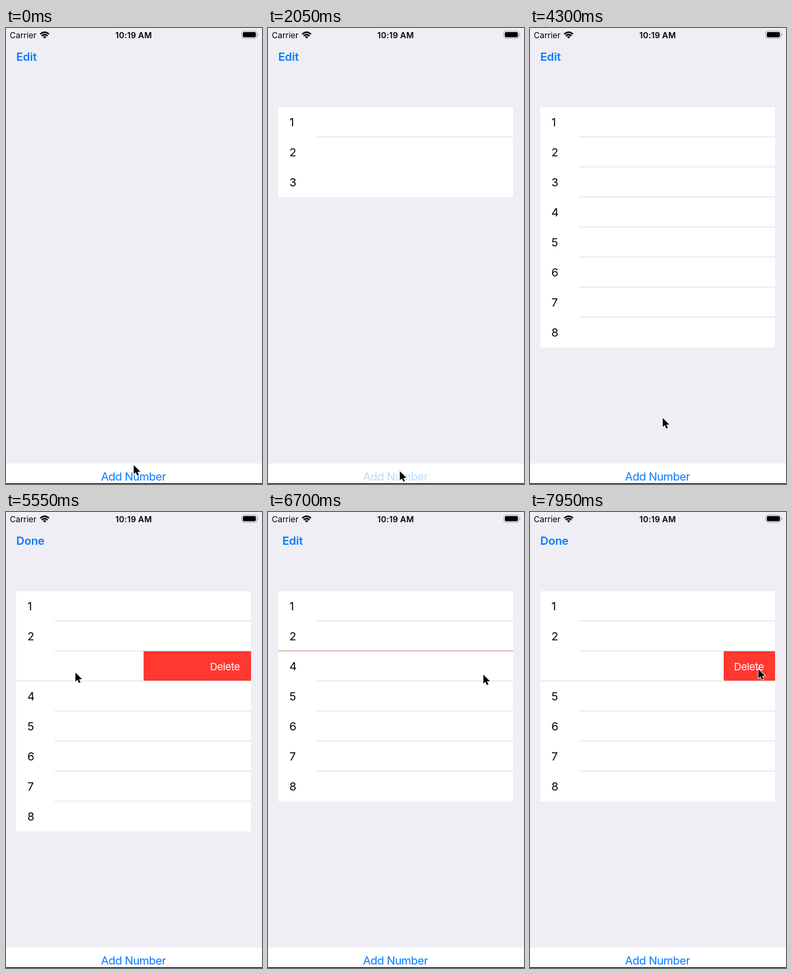
An HTML page that plays this animation: 374x668 px, repeating every 8 s.

```html
<!DOCTYPE html>
<html lang="en">
<meta charset="utf-8">
<title>Number list</title>
<style>
  html, body { margin: 0; width: 100%; height: 100%; overflow: hidden; background: #efeef5; }
  svg { display: block; }
  text { font: 16.5px Inter, "Liberation Sans", sans-serif; letter-spacing: -.4px; }
  .bold { font-weight: 600; letter-spacing: -.15px; }
  .status { font-size: 12px; letter-spacing: -.05px; }
  .time { letter-spacing: .12px; }
  .blue { fill: #007aff; }
  .delete { font-size: 15px; letter-spacing: -.3px; fill: #fff; }
  .sep { fill: #dededf; }
</style>
<svg width="374" height="668" viewBox="0 0 374 668">
  <rect width="374" height="668" fill="#efeef5"/>
  <text class="status" x="5.5" y="14.5">Carrier</text>
  <g fill="none" stroke="#000" stroke-width="2.3">
    <path d="M50 9Q56.4 3.2 62.8 9M52.2 11.6Q56.4 8 60.6 11.6"/>
    <path d="M56.4 15.6L54 13Q56.4 11.2 58.8 13Z" fill="#000" stroke="none"/>
  </g>
  <text class="bold status time" x="186.5" y="14.5" text-anchor="middle">10:19 AM</text>
  <rect x="344.5" y="4.5" width="22" height="10.5" rx="3" fill="none" stroke="#a5a5aa"/>
  <rect x="346" y="6" width="19" height="7.5" rx="1.7"/>
  <path d="M367.7 8v3.6q1.3-.6 1.3-1.8t-1.3-1.8" fill="#a5a5aa"/>
  <text id="edit" class="blue bold" y="48">Edit</text>
  <text id="done" class="blue bold" x="15" y="48">Done</text>
  <g id="list"></g>
  <rect y="638" width="374" height="30" fill="#fff"/>
  <text id="add" class="blue" x="186.2" y="662.5" text-anchor="middle">Add Number</text>
  <rect y="667" width="374" height="1"/>
  <g id="cursor">
    <path d="M.6 1.2v13.2l3-2.7 2.1 4.8 2.3-1-2.1-4.6h4.3Z"
          stroke="#fff" stroke-width="1.6" paint-order="stroke"/>
  </g>
</svg>
<script>
const LOOP = 8000, LEFT = 15, RIGHT = 358, WIDTH = RIGHT - LEFT, TOP = 116, ROW = 44;
const BUTTON = 75;

const $ = id => document.getElementById(id);
const clamp = u => Math.min(1, Math.max(0, u));
const mix = (a, b, u) => a + (b - a) * u;
const smooth = u => u * u * (3 - 2 * u);
const easeIn = u => u * u;
const easeOut = u => u * (2 - u);
// Progress from 0 to 1 of a step that begins at start
const step = (t, start, time, ease = smooth) => ease(clamp((t - start) / time));

// The first tap is slow, the others come ever faster
const taps = Array.from({ length: 8 }, (_, i) => {
  const k = i - 1, up = i ? 1600 + 440 * k - 11 * k * k : 780;
  return { down: up - (i ? 140 : 290), up };
});

const swipes = [
  { row: 3, from: 4700, to: 5500, remove: 6150 },
  { row: 4, from: 6800, to: 7300, remove: Infinity }
];

// Cursor moves: start, duration, end x, end y, easing
const moves = [
  [50, 300, 192, 648],
  [4000, 300, 193, 573, easeIn],
  [4300, 250, 233, 219, easeOut],
  [4700, 650, 73, 231],
  [5500, 50, 100, 234, easeIn],
  [5550, 500, 314, 237, easeOut],
  [6800, 400, 205, 240],
  [7300, 500, 333, 229]
];

function cursorAt(t) {
  let x = 186, y = 639;
  for (const [start, time, toX, toY, ease] of moves) {
    const u = step(t, start, time, ease);
    x = mix(x, toX, u);
    y = mix(y, toY, u);
  }
  return { x, y };
}

// Follows the cursor, settles on the button, then fills the row
function swipeWidth(t, { from, to, remove }) {
  const drag = cursorAt(from).x - cursorAt(Math.min(t, to)).x;
  const open = mix(drag, BUTTON, step(t, to, 450));
  return mix(open, WIDTH, step(t, remove, 200, easeOut));
}

const rect = (x, y, w, h, attrs) =>
  `<rect x="${x}" y="${y}" width="${w}" height="${h}" ${attrs}/>`;

function swipedRow(n, y, h, w) {
  return `<svg x="${LEFT}" y="${y}" width="${WIDTH}" height="${h}" viewBox="0 0 ${WIDTH} ${h}">
    <text x="${16.3 - w}" y="28">${n}</text>
    ${rect(WIDTH - w, 0, w, h, 'fill="#ff3830"')}
    <svg x="${WIDTH - w}" width="${w}" height="${h}">
      <text class="delete" x="${w - 60}" y="27.7">Delete</text>
    </svg></svg>`;
}

function drawList(t) {
  const count = taps.filter(tap => tap.up <= t).length;
  let y = TOP, out = "";
  for (let n = 1; n <= count; n++) {
    const swipe = swipes.find(s => s.row === n && t > s.from);
    if (swipe && t > swipe.remove + 610) continue;
    const h = swipe ? ROW * (1 - step(t, swipe.remove, 470, easeOut)) : ROW;
    if (!swipe) out += `<text x="31.3" y="${y + 28}">${n}</text>`;
    else if (h > 0) out += swipedRow(n, y, h, swipeWidth(t, swipe));
    if (n < count) {
      const x = swipe ? LEFT : 71, shown = step(t, taps[n].up + 200, 150);
      const look = h ? `class="sep" opacity="${shown}"` : 'fill="#c58682"';
      out += rect(x, y + h - 1, RIGHT - x, 1, look);
    }
    y += h;
  }
  return rect(LEFT, TOP, WIDTH, y - TOP, 'fill="#fff"') + out;
}

function buttonAlpha(t) {
  const tap = taps.findLast(tap => tap.down <= t);
  return tap ? mix(.2, 1, clamp((t - tap.up) / 250)) : 1;
}

function draw(now) {
  const t = now % LOOP, { x, y } = cursorAt(t);
  const done = swipes.reduce((sum, s) =>
    sum + step(t, s.from + 80, 200) - step(t, s.remove + 370, 140), 0);
  const centred = t > swipes[0].remove ? 6 : 0;
  $("list").innerHTML = drawList(t);
  $("add").setAttribute("opacity", buttonAlpha(t));
  $("done").setAttribute("opacity", done);
  $("edit").setAttribute("opacity", 1 - done);
  $("edit").setAttribute("x", 15 + centred * (1 - step(t, swipes[0].remove + 570, 230)));
  $("cursor").setAttribute("transform", `translate(${x} ${y})`);
  requestAnimationFrame(draw);
}
draw(0);
</script>
</html>
```
